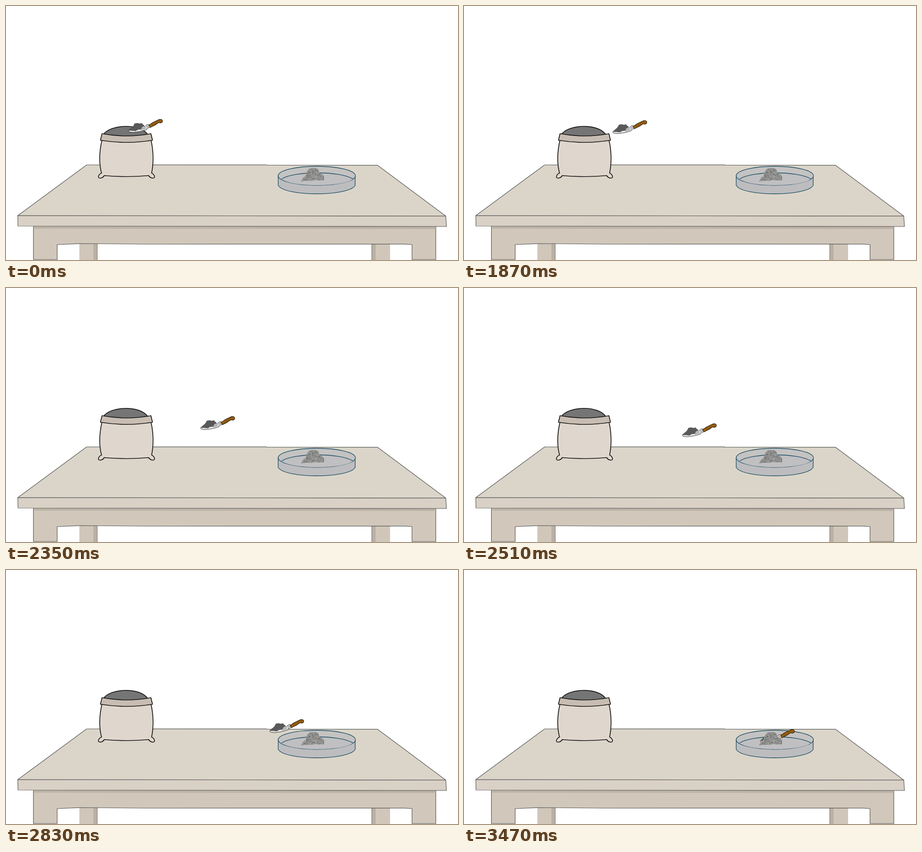
Animation of 998 by 561 pixels, one loop 5.02 s. Source, as an HTML page:

```html
<!DOCTYPE html>
<html lang="en">
<head>
<meta charset="utf-8">
<title>Trowel and dish</title>
<style>
html, body { margin: 0; width: 100%; height: 100%; overflow: hidden; background: #fff; }
svg { display: block; width: 100%; height: 100%; }
</style>
</head>
<body>
<svg viewBox="0 0 998 561" stroke-linejoin="round">
  <defs>
    <clipPath id="rockClip"><path id="rockShape" d="M651 387.5L656 379L661 375L664 366L669 359L676 357.5L685 358L690 361L692 368L699 372L702.5 377L702 385L692 385.500L683 384.500L674 386.500L665 386Z"/></clipPath>
  </defs>

  <g id="table" stroke="#555" stroke-width="1.2">
    <g stroke="none">
      <path fill="#d0c7ba" d="M162 525h40v36h-40zM807 525h41v36h-41z"/>
      <path fill="#bab0a4" d="M193 525h9v36h-9zM807 525h9v36h-9z"/>
    </g>
    <path d="M201.500 525v36M807.500 525v36" stroke="#857d74"/>
    <path fill="#d1c8bb" d="M60.500 486L949 487V560H896.500V527L880 525.800L310 526L202 525L162 524.800L113 527V560H60.500Z"/>
    <path fill="#bcb2a6" stroke="none" d="M61 486H948.500V492.500L61 491.500Z"/>
    <path fill="#dbd5c9" d="M178 351L575 350.800L575 351.500L820 351.600L971 464L26 463Z"/>
    <path fill="#d9d1c6" d="M26 463L971 464L972.500 487L26.500 486Z"/>
  </g>

  <g id="bag" stroke="#111" stroke-width="1.7">
    <path fill="#dfd6cd" d="M212 296C206 320 205 348 211 369C207 370 203 375 204.500 379C207 381.500 214 380 217 374.500Q266 379 315 374.500C318 380 325 381.500 327.500 379C329 375 325 370 321.500 369C326 348 326 320 320 296Z"/>
    <path fill="#757575" d="M214 285C230 260 297 259 313 284L264 290Z"/>
    <path fill="#c8bdb2" d="M212 282Q266 292 320 282L323.500 296.500Q266 306 208.500 296.500Z"/>
  </g>

  <g id="dish" stroke="#174a60" stroke-width="1.300">
    <path fill="#bdbdbf" d="M601 374.500V396C614 421 758 421 771 396V374.500Z"/>
    <ellipse cx="686.300" cy="375" rx="85.300" ry="21" fill="#c4c3c2"/>
    <path fill="#c0bfc1" d="M608.500 382C636 364 738 364 766 382C745 400.500 629 400.500 608.500 382Z" stroke="none"/>
    <path fill="none" d="M608.500 382C636 364 738 364 766 382"/>
  </g>

  <g id="trowel">
    <path fill="#e9e9e9" stroke="#222" stroke-width=".9" d="M319 275.500L324 271L335 263L352 263L355 267L360 262L365 261.500L367 268L360 270.500L360 273L346 277L330 279.300L321 278Z"/>
    <path fill="#b5b5b5" d="M346 272L353 266L358 269L357 272L347 275ZM358 265L365 262.500L366 267L359 269Z"/>
    <path fill="#595959" stroke="#444" stroke-width=".6" d="M319.500 275L326 270L331 264L333 259.800L339 258.800L344 260L349 259L351 262L354.500 264L349 268L347 272L340 273L335 276L327 275Z"/>
    <path fill="#9a6112" stroke="#2d1b06" stroke-width="1.200" d="M364.500 263.500L372 258L382 253L388 250.300L392.500 250.500L394.700 253.500L393.500 257.200L389.500 258.300L386 257.500L379 262.500L367.500 268.300Z"/>
    <path fill="none" stroke="#5c390b" stroke-width=".9" d="M371 260l3 4M375 258l3 4M379 255.500l3 4M383 253.500l3 4M387 251.500l3 4"/>
  </g>

  <g id="rock" clip-path="url(#rockClip)">
    <use href="#rockShape" fill="#929291"/>
  </g>
</svg>
<script>
const LOOP = 5020, START = 1550, END = 3470, STEP = 40;
const trowel = document.getElementById('trowel');
const rock = document.getElementById('rock');

let seed = 7;
function rand() {
  seed = (seed * 16807) % 2147483647;
  return seed / 2147483647;
}

function addSpeckles(count) {
  for (let i = 0; i < count; i++) {
    const dot = document.createElementNS('http://www.w3.org/2000/svg', 'ellipse');
    const attrs = {
      cx: 651 + rand() * 52, cy: 357 + rand() * 31,
      rx: 0.7 + rand() * 1.3, ry: 0.6 + rand() * 1.2,
      fill: rand() < 0.6 ? '#666' : '#acacaa', opacity: 0.65
    };
    for (const key in attrs) dot.setAttribute(key, attrs[key]);
    rock.appendChild(dot);
  }
}

function ease(t) {
  const u = Math.min(1, Math.max(0, t));
  return u * u * u * (10 - 15 * u + 6 * u * u);
}

function render(t) {
  let x = -49, y = 0;
  if (t >= START) {
    const tick = Math.min(END, START + Math.floor((t - START) / STEP) * STEP);
    const p = ease((tick - START - 37) / 1875);
    x = 335 * p;
    y = 102 * p;
  }
  trowel.setAttribute('transform', `translate(${x.toFixed(2)} ${y.toFixed(2)})`);
}

addSpeckles(110);
const origin = performance.now();
function loop() {
  render((performance.now() - origin) % LOOP);
  requestAnimationFrame(loop);
}
loop();
</script>
</body>
</html>
```
